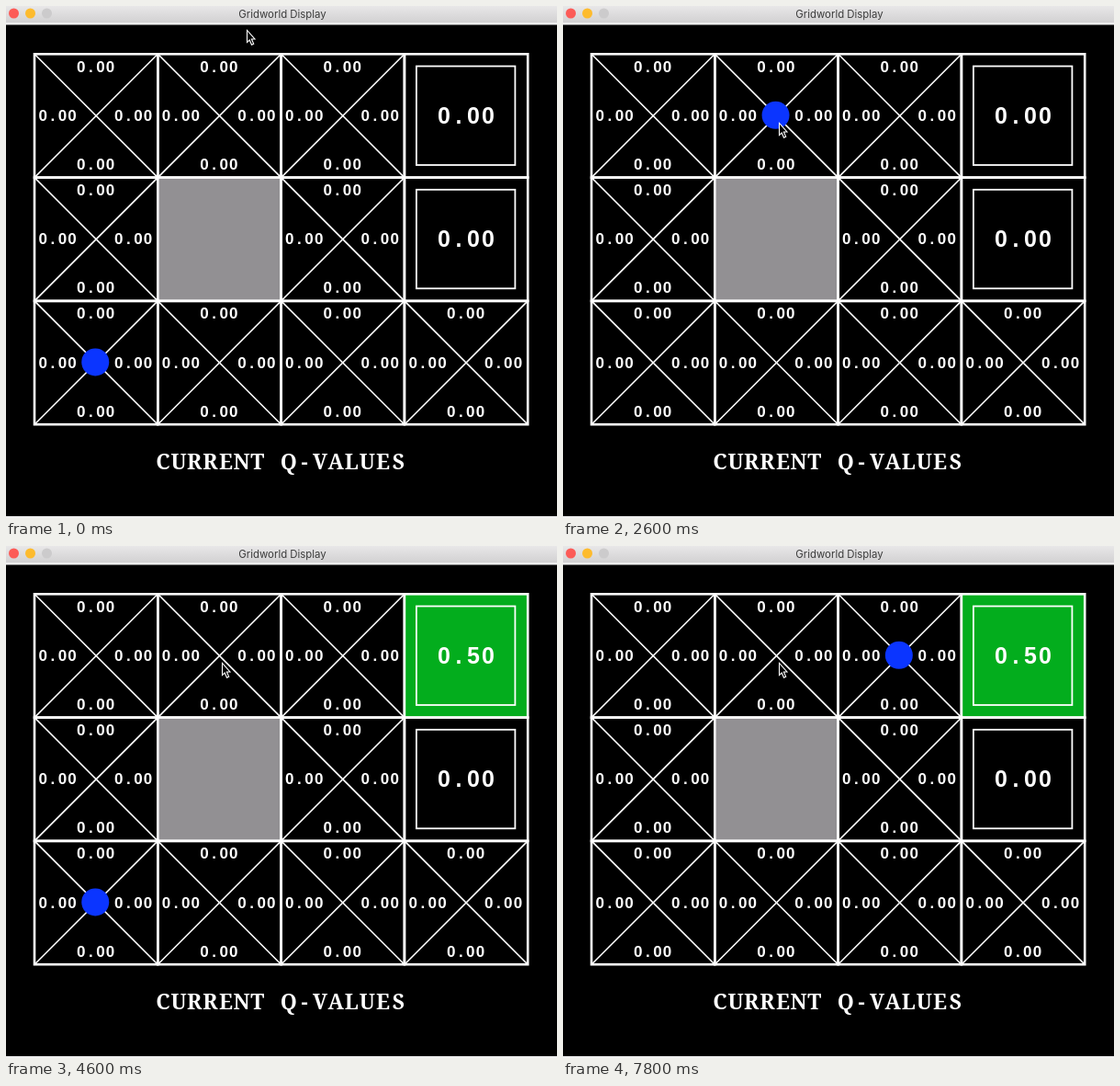
An HTML page with a canvas for the animation above (8 s loop, 600x557 px).

```html
<!DOCTYPE html>
<html lang="en">
<head>
<meta charset="utf-8">
<title>Gridworld Display</title>
<style>
html, body { margin: 0; width: 100%; height: 100%; overflow: hidden; background: #000; }
canvas { display: block; }
</style>
</head>
<body>
<canvas id="stage" width="600" height="557"></canvas>
<script>
const ctx = document.getElementById('stage').getContext('2d');
const LOOP = 8000, CELL = 134.3, LEFT = 31, TOP = 52.3;
const EXIT_TIME = 4600, CURSOR_TIME = 200;
const DIGITS = 'bold SIZEpx "Liberation Sans", Arial, sans-serif';
const SERIF = 'bold SIZEpx "Noto Serif", serif';

// Agent moves: time in ms, column, row
const moves = [
  [0, 0, 2], [800, 0, 1], [1400, 0, 0], [2600, 1, 0], [3200, 2, 0], [4000, 3, 0],
  [4600, 0, 2], [5200, 0, 1], [6600, 0, 0], [7200, 1, 0], [7800, 2, 0]
];

function rect(x, y, w, h, color) {
  ctx.fillStyle = color;
  ctx.fillRect(x, y, w, h);
}

function disc(x, y, r, color) {
  ctx.fillStyle = color;
  ctx.beginPath();
  ctx.arc(x, y, r, 0, 2 * Math.PI);
  ctx.fill();
}

function frame(x, y, size, width) {
  ctx.lineWidth = width;
  ctx.strokeRect(x, y, size, size);
}

// Typewriter text: every character is centred in a column of equal pitch
function mono(text, x, y, font, size, pitch) {
  ctx.font = font.replace('SIZE', size);
  ctx.fillStyle = '#fff';
  [...text].forEach((c, i) =>
    ctx.fillText(c, x + (i - (text.length - 1) / 2) * pitch, y + size * 0.355));
}

function drawWindow() {
  rect(0, 0, 600, 557, '#000');
  const bar = ctx.createLinearGradient(0, 0, 0, 18);
  bar.addColorStop(0, '#e8e7e8');
  bar.addColorStop(1, '#d2d1d2');
  rect(0, 0, 600, 18, bar);
  rect(0, 18, 600, 2.5, '#eee');
  rect(0, 555, 600, 2, '#eee');
  ['#fc5b57', '#fdbb2e', '#cccbcc'].forEach((c, i) => disc(8.5 + 18 * i, 8, 5.5, c));
  ctx.font = '11.4px Inter, sans-serif';
  ctx.fillStyle = '#3c3c3c';
  ctx.fillText('Gridworld Display', 301, 12.5);
}

function drawQCell(x, y, cx, cy) {
  ctx.lineWidth = 1.6;
  ctx.beginPath();
  ctx.moveTo(x, y);
  ctx.lineTo(x + CELL, y + CELL);
  ctx.moveTo(x + CELL, y);
  ctx.lineTo(x, y + CELL);
  ctx.stroke();
  for (const [dx, dy] of [[0, -53.5], [0, 53], [-41.5, 0], [41, 0]])
    mono('0.00', cx + dx - 0.5, cy + dy - 0.3, DIGITS, 17, 10.6);
}

function drawCell(col, row, agentHere, rewarded) {
  const x = LEFT + col * CELL, y = TOP + row * CELL;
  const cx = x + CELL / 2, cy = y + CELL / 2;
  const terminal = col === 3 && row < 2;
  const good = terminal && row === 0 && rewarded;
  const agent = () => agentHere && disc(cx - 0.9, cy - 0.6, 15, '#0b35ff');

  if (col === 1 && row === 1) {
    rect(x, y, CELL, CELL, '#929093');
  } else if (terminal) {
    if (good) rect(x, y, CELL, CELL, '#03ad1d');
    frame(x + 13, y + 13.2, 107.5, 1.8);
    agent();
    mono(good ? '0.50' : '0.00', cx, cy - 0.2, DIGITS, 25, 16);
  } else {
    drawQCell(x, y, cx, cy);
    agent();
  }
  frame(x, y, CELL, 2.6);
}

function drawCursor(x, y) {
  ctx.save();
  ctx.translate(x, y);
  ctx.lineWidth = 1.1;
  ctx.fillStyle = '#000';
  ctx.fill(arrow);
  ctx.stroke(arrow);
  ctx.restore();
}
const arrow = new Path2D('M.5 .5V13.5L3.2 11L5.5 16.2L7.7 15.2L5.4 10H9Z');

function draw(t) {
  const [, agentCol, agentRow] = moves.findLast(m => m[0] <= t);
  ctx.textAlign = 'center';
  ctx.strokeStyle = '#fff';
  drawWindow();
  for (let row = 0; row < 3; row++)
    for (let col = 0; col < 4; col++)
      drawCell(col, row, col === agentCol && row === agentRow, t >= EXIT_TIME);
  mono('CURRENT Q-VALUES', 299.3, 495.5, SERIF, 23, 17.1);
  if (t < CURSOR_TIME) drawCursor(262, 26);
  else drawCursor(235, 127);
}

function tick() {
  draw(performance.now() % LOOP);
  requestAnimationFrame(tick);
}
tick();
</script>
</body>
</html>
```
